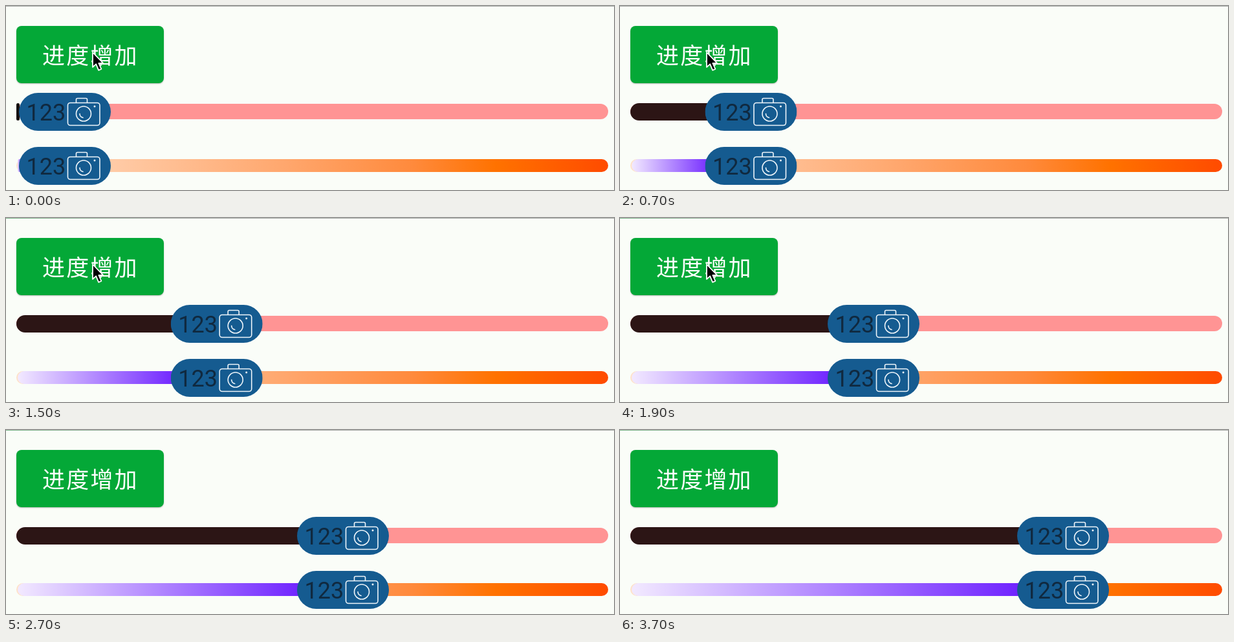
Recreate the animation shown at these times as an HTML page. Size 940x286 px, loop 3800 ms.

```html
<!DOCTYPE html>
<html lang="zh">
<head>
<meta charset="utf-8">
<style>
@property --x { syntax: "<length>"; inherits: true; initial-value: 20px; }

html, body { margin: 0; width: 100%; height: 100%; overflow: hidden; background: #fafdf8; }
.stage {
  position: relative; width: 940px; height: 286px; overflow: hidden;
  animation: slide 3.8s infinite;
}
.stage > * { position: absolute; }

.edge { left: 0; top: 0; width: 940px; height: 1px; background: #acaeab; }
.tint {
  left: 0; top: 0; width: 260px; height: 1px; opacity: 0;
  background: linear-gradient(90deg, #7fb98d, #acaeab);
  animation: tint 3.8s step-end infinite;
}
.button {
  left: 16px; top: 31px; width: 228px; height: 89px; border-radius: 8px;
  background: #04a837; box-shadow: 0 1px 2px #0004;
}
.button text {
  font: 35px "Noto Sans CJK SC", "Noto Sans CJK", sans-serif;
  letter-spacing: 2.2px; fill: #fff;
}
.track { left: 16px; width: 915px; }
.pink { top: 152px; height: 24px; border-radius: 12px; background: #ff9494; }
.orange {
  top: 238px; height: 20px; border-radius: 10px;
  background: linear-gradient(90deg, #ffe2c8, #ffcaa5 17%, #ffa66c 46%, #ff8a3c 67%, #ff7200 81%, #ff4b00);
}
.dark {
  left: 16px; top: 151px; height: 27px; border-radius: 13.5px;
  width: min(var(--x) + 14px, (var(--x) - 20px) * 4 + 5px);
  background: #2c1515;
  animation: ink 3.8s step-end infinite;
}
.violet {
  left: 18px; top: 238px; height: 20px; border-radius: 10px;
  width: min(var(--x) - 3px, (var(--x) - 20px) * 4 + 6px);
  background: linear-gradient(90deg, #f2e9ff, #6d20ff);
}
.thumb { left: 0; width: 142px; height: 59px; transform: translateX(var(--x)); }
.thumb text { font: 36px Roboto, sans-serif; fill: #10293f; }
.cursor { left: 130px; top: 68px; animation: point 3.8s infinite; }

@keyframes slide {
  0% { --x: 20px; animation-timing-function: steps(7); }
  18.421% { --x: 131.5px; animation-timing-function: steps(5); }
  31.578% { --x: 205px; animation-timing-function: steps(7); }
  50% { --x: 321px; animation-timing-function: steps(4); }
  60.526% { --x: 386px; animation-timing-function: steps(8); }
  81.578% { --x: 514px; animation-timing-function: steps(6); }
  97.368%, 100% { --x: 614px; }
}
@keyframes ink {
  0% { background: #15100f; }
  2.631%, 100% { background: #2c1515; }
}
@keyframes tint {
  0% { opacity: 0; }
  26.315%, 100% { opacity: 1; }
}
@keyframes point {
  0%, 50% { transform: none; opacity: 1; animation-timing-function: steps(4); }
  60.526% { transform: translateY(11px); opacity: 1; animation-timing-function: step-end; }
  68.421%, 100% { transform: translateY(11px); opacity: 0; }
}
</style>
</head>
<body>
<div class="stage">
  <div class="edge"></div>
  <div class="tint"></div>
  <div class="button">
    <svg width="228" height="89"><text x="40" y="59">进度增加</text></svg>
  </div>

  <div class="track pink"></div>
  <div class="dark"></div>
  <div class="track orange"></div>
  <div class="violet"></div>

  <svg class="thumb" style="top:135px">
    <g id="thumb">
      <rect width="142" height="59" rx="29.5" fill="#155b90"/>
      <text x="11.5" y="43">123</text>
      <g fill="none" stroke="#eef5fa" stroke-width="1.6" stroke-linecap="round">
        <rect x="75.5" y="15.5" width="49.5" height="35" rx="4"/>
        <path d="M88.5 15V10.500q0-2 2-2h13q2 0 2 2V15"/>
        <circle cx="100" cy="32.500" r="11.500"/>
        <path d="M94 32.500a6 6 0 0 0 5 6"/>
      </g>
      <circle cx="117" cy="21" r="1.500" fill="#eef5fa"/>
    </g>
  </svg>
  <svg class="thumb" style="top:219px"><use href="#thumb"/></svg>

  <svg class="cursor" width="26" height="38">
    <path d="M4 4v23l5.200-4.700 4 9.500 4.200-1.800-4-9.200h6.800z"
      fill="#000" stroke="#fff" stroke-width="1.800" stroke-linejoin="round"/>
  </svg>
</div>
</body>
</html>
```
